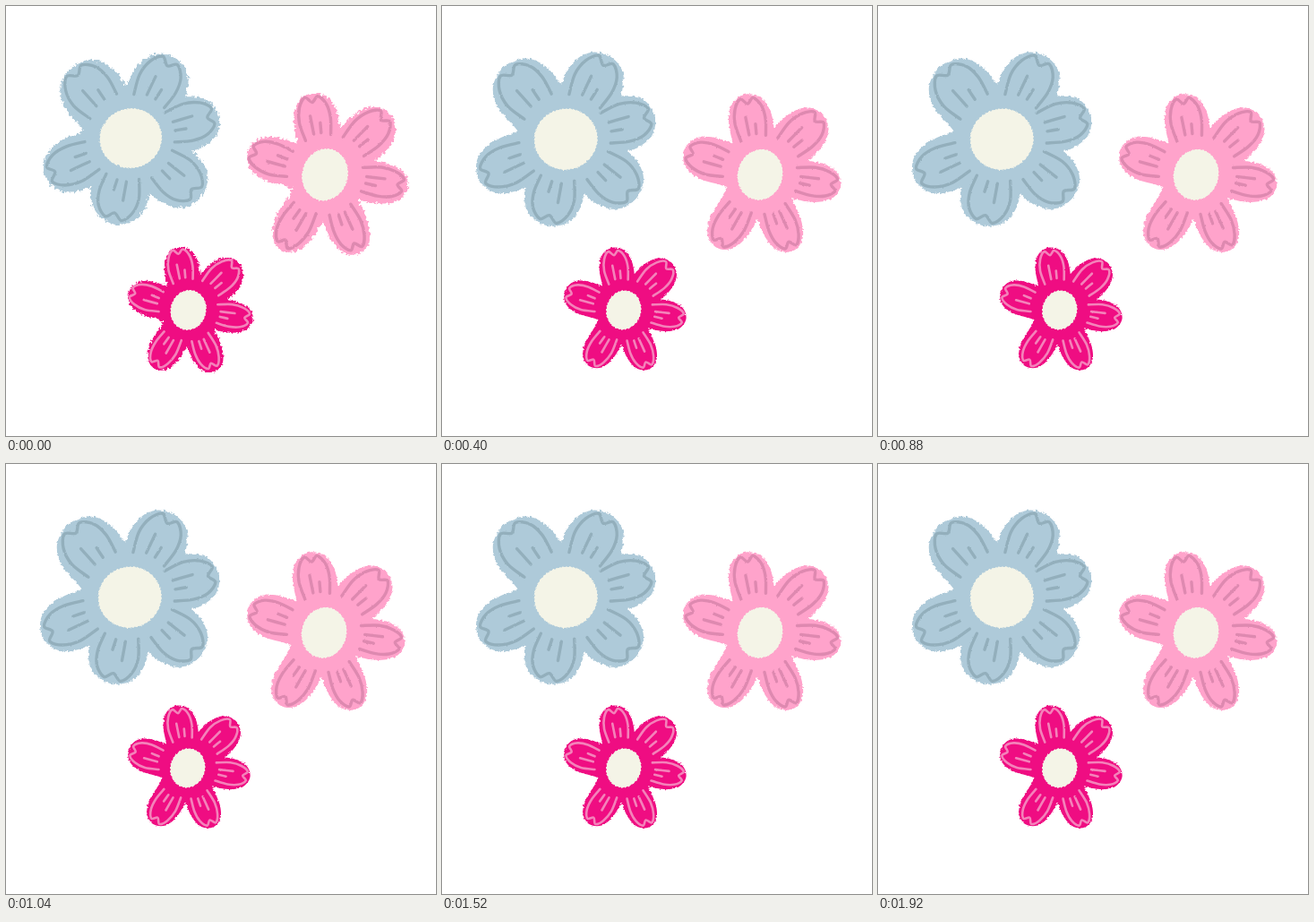
Animation of 480x480 px, one loop 2 s. Source, as an HTML page:

```html
<!DOCTYPE html>
<html lang="en">
<head>
<meta charset="utf-8">
<title>Wiggling flowers</title>
<style>
  html, body { margin: 0; width: 100%; height: 100%; overflow: hidden; background: #fff; }
  svg { display: block; width: 100%; height: 100%; }
  path { stroke-linecap: round; stroke-linejoin: round; }
</style>
</head>
<body>
<svg id="stage" viewBox="0 0 480 480"></svg>
<script>
// One petal for all flowers: x runs from the centre to the tip, y across the half width.
const half = [[0, .9], [.45, 1], [.72, 1], [.92, .68]];
const mirrored = half.map(([x, y]) => [x, -y]);
const outline = [...mirrored, [1, 0], ...half.reverse()];
const veins = [
  [[.44, -.6], [.66, -.74], [.84, -.62], [.95, -.3], [.88, 0], [.94, .3], [.83, .62], [.66, .7], [.46, .58]],
  [[.5, -.18], [.72, -.2]],
  [[.5, .16], [.62, .2]]
];

// Petals are [angle in degrees, length, half width].
const broad = {
  core: { rx: 35.5, ry: 34, turn: -15 },
  rest: { dx: 1, dy: -1, scale: .98 },
  petals: [[-130, 106, 35], [-63, 105, 32], [-15, 103, 30], [40, 103, 33], [102, 99, 32], [156, 107, 30]]
};
const slim = {
  core: { rx: 25, ry: 28.5, turn: 15 },
  rest: { dx: 1, dy: 0, scale: 1.022 },
  petals: [[-100, 91, 24], [-44, 97, 26], [8, 91, 22], [67, 93, 22], [121, 95, 23], [197, 89, 24]]
};
const flowers = [
  { shape: broad, x: 138, y: 148.5, size: 1, fill: "#aecad9", ink: "#93afbc" },
  { shape: slim, x: 355, y: 188, size: 1, fill: "#ffa3cb", ink: "#de89b0" },
  { shape: slim, x: 202.7, y: 339.2, size: .775, fill: "#ef0d82", ink: "#f482ba" }
];

// Catmull-Rom curve through the points.
function curve(points, closed = false) {
  const count = points.length;
  const at = i => points[closed ? (i + count) % count : Math.max(0, Math.min(count - 1, i))];
  let d = "M" + points[0];
  for (let i = 0; i < count - (closed ? 0 : 1); i++) {
    const [a, b, c, e] = [at(i - 1), at(i), at(i + 1), at(i + 2)];
    const from = b.map((v, k) => v + (c[k] - a[k]) / 6);
    const to = c.map((v, k) => v - (e[k] - b[k]) / 6);
    d += `C${from} ${to} ${c}`;
  }
  return d + (closed ? "Z" : "");
}

function placeOnPetal(points, [angle, length, width]) {
  const cos = Math.cos(angle * Math.PI / 180), sin = Math.sin(angle * Math.PI / 180);
  return points.map(([x, y]) => [
    x * length * cos - y * width * sin,
    x * length * sin + y * width * cos
  ]);
}

function drawFlower({ shape, x, y, size, fill, ink }, pose) {
  const { core, petals } = shape;
  const { dx, dy, scale } = pose ? { dx: 0, dy: 0, scale: 1 } : shape.rest;
  const edge = petals.map(p => curve(placeOnPetal(outline, p), true)).join("");
  const lines = petals.flatMap(p => veins.map(v => curve(placeOnPetal(v, p)))).join("");
  return `<g transform="translate(${x + dx * size} ${y + dy * size}) scale(${size * scale})">
    <path d="${edge}" fill="${fill}" filter="url(#edge${pose})"/>
    <path d="${lines}" fill="none" stroke="${ink}" stroke-width="3.4" filter="url(#line${pose})"/>
    <ellipse rx="${core.rx}" ry="${core.ry}" transform="rotate(${core.turn})" fill="#f4f4e7" filter="url(#line${pose})"/>
  </g>`;
}

// The offset cancels the drift that the noise adds.
const roughFilter = (id, strength, seed) => `
  <filter id="${id}" x="-5%" y="-5%" width="110%" height="110%" color-interpolation-filters="sRGB">
    <feTurbulence type="fractalNoise" baseFrequency=".32" numOctaves="2" seed="${seed}"/>
    <feDisplacementMap in="SourceGraphic" scale="${strength}" xChannelSelector="R" yChannelSelector="G"/>
    <feOffset dx="${strength * .1}" dy="${strength * .1}"/>
  </filter>`;

const stage = document.getElementById("stage");
stage.innerHTML = [0, 1].map(pose =>
  roughFilter("edge" + pose, pose ? 4 : 7, 3 + pose * 8) +
  roughFilter("line" + pose, 2, 5 + pose * 8) +
  `<g class="pose">${flowers.map(f => drawFlower(f, pose)).join("")}</g>`).join("");
const poses = [...stage.querySelectorAll(".pose")];

// Rest, then swap poses every 80 ms; the last pose is held twice as long.
function poseAt(time) {
  const step = Math.floor((time % 2000 - 240) / 80);
  if (step < 0) return 0;
  return step >= 20 || step % 2 === 0 ? 1 : 0;
}

const start = performance.now();
function render() {
  const current = poseAt(performance.now() - start);
  poses.forEach((group, i) => group.setAttribute("visibility", i === current ? "visible" : "hidden"));
  requestAnimationFrame(render);
}
render();
</script>
</body>
</html>
```
